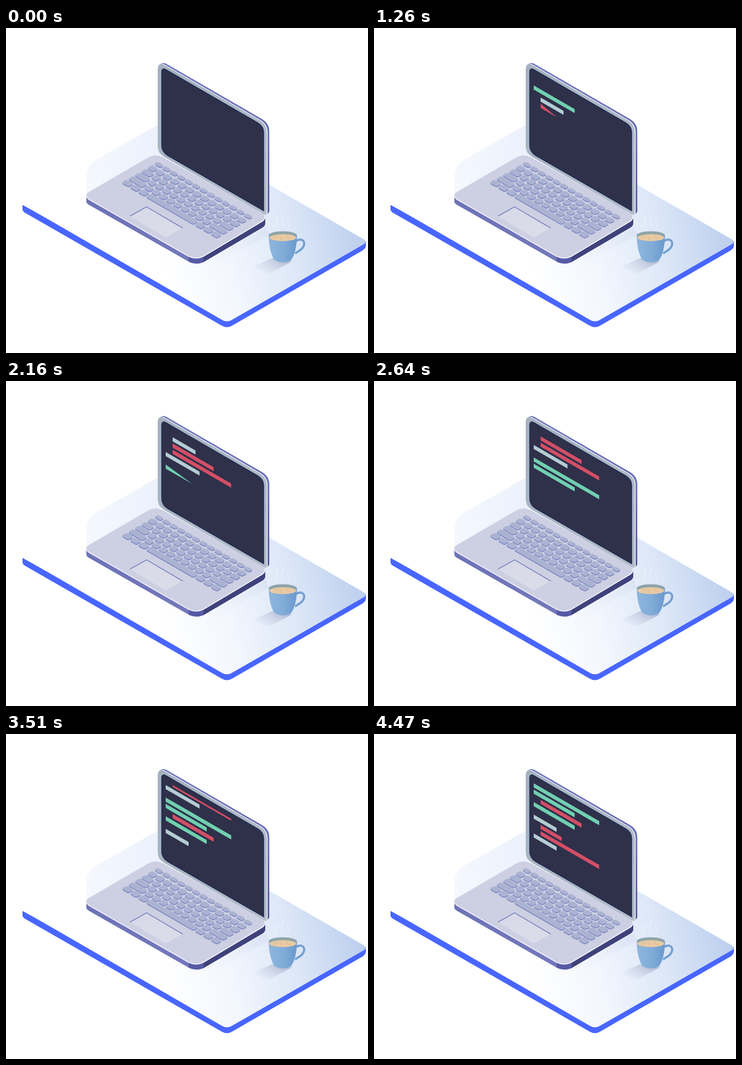
An HTML page that plays this animation: 680x610 px, repeating every 4.5 s.

```html
<!DOCTYPE html>
<html lang="en">
<head>
<meta charset="utf-8">
<title>Laptop typing code</title>
<style>
html, body { margin: 0; width: 100%; height: 100%; overflow: hidden; background: #fff; }
svg { display: block; width: 680px; height: 610px; }
</style>
</head>
<body>
<svg viewBox="0 0 680 610">
  <defs>
    <linearGradient id="desk" gradientUnits="userSpaceOnUse" x1="290" y1="440" x2="674" y2="355">
      <stop offset="0" stop-color="#fff"/><stop offset=".33" stop-color="#f2f6fd"/>
      <stop offset=".65" stop-color="#dbe6f7"/><stop offset="1" stop-color="#bacdee"/>
    </linearGradient>
    <linearGradient id="pale"><stop offset="0" stop-color="#f5f8fe"/><stop offset="1" stop-color="#ebf1fc"/></linearGradient>
    <linearGradient id="lid" x1="0" y1="0" x2="0" y2="1"><stop offset="0" stop-color="#767cc2"/><stop offset="1" stop-color="#4d519c"/></linearGradient>
    <linearGradient id="frame" x1="0" y1="0" x2="1" y2="1"><stop offset="0" stop-color="#a5b1bf"/><stop offset="1" stop-color="#b3bcca"/></linearGradient>
    <linearGradient id="side"><stop offset="0" stop-color="#6d73b7"/><stop offset="1" stop-color="#7479bd"/></linearGradient>
    <linearGradient id="pad" x1="0" y1="0" x2="0" y2="1"><stop offset="0" stop-color="#d7d9e8"/><stop offset="1" stop-color="#dcdde9"/></linearGradient>
    <linearGradient id="cup"><stop offset="0" stop-color="#8db7dd"/><stop offset=".55" stop-color="#80abd8"/><stop offset="1" stop-color="#6a99cd"/></linearGradient>
    <linearGradient id="shade" x1="1" y1="0" x2="0" y2=".7"><stop offset=".2" stop-color="#a9b2cc" stop-opacity=".85"/><stop offset="1" stop-color="#d5dcec" stop-opacity=".1"/></linearGradient>
    <linearGradient id="cast" x1="1" y1="0" x2="0" y2="1"><stop offset="0" stop-color="#d3dbee" stop-opacity=".6"/><stop offset="1" stop-color="#eef1f9" stop-opacity=".1"/></linearGradient>
  </defs>

  <!-- desk -->
  <path fill="#4866ff" d="M31 332V340Q31 344 36 347L405 558.500Q415 564.500 425 558.500L670 417.500Q676 413.500 676 408V400L415 545Z"/>
  <path fill="url(#desk)" d="M35 333.500L406 548Q415 553 424 548L671 406.500Q680 401 671 396L305 185Q294 178 283 182L35 325Q28 329 35 333.500Z"/>
  <path fill="url(#pale)" d="M290 179L168 248Q151 258 151 283V318L290 260Z"/>
  <path fill="url(#cast)" d="M372 441L487 374L496 388L398 440Z"/>

  <!-- base -->
  <path fill="url(#side)" d="M151 315V326Q151 329 156 332L344 439L357 432Z"/>
  <path fill="#3f427b" d="M370 440L482 374.500Q487 371.500 487 366V356L357 425Z"/>
  <path fill="#575ba6" d="M343 428V438.500Q357 445.500 371 439.500V428Z"/>
  <path fill="#cdd0e2" d="M157 307L262 246Q278 235 294 242L480 346Q487 350 487 356Q487 360 481 363.500L371 428.500Q357 435.500 343 428.500L157 323Q151 319 151 314Q151 310 157 307Z"/>
  <path fill="none" stroke="#f4f5fc" stroke-width="1.600" d="M152 316Q152 320 158 323L343 428.500Q357 435.500 371 428.500L481 363Q487 359 486 353"/>
  <g id="keys" transform="matrix(.866 .5 -.866 .5 285 251)"></g>
  <path fill="url(#pad)" d="M264 337L331 376L300 393L234 354Z"/>
  <path fill="none" stroke="#7b82bd" stroke-width="1.500" d="M233 353L264 335.500L332 375.500"/>

  <!-- lid -->
  <path fill="url(#lid)" d="M288 71Q292 63 301 67L481 171Q494.500 179 494.500 194V343Q494.500 348 488 350L470 330Z"/>
  <path fill="#f3f5fb" d="M286 74Q290 64 298.500 69L478.500 173Q491.500 181 491.500 196V349L484 349Z"/>
  <path fill="url(#frame)" d="M285 79Q285 63.500 297 69.500L477 173.500Q490 181.500 490 196V345Q490 352 484 349L297 242Q285 235 285 222Z"/>
  <path fill="#2f304a" stroke="#1b2c51" stroke-width="1.500" d="M292.500 83Q292.500 74 300 78L473 178Q484 185 484 196V343L303 239Q292.500 232 292.500 221Z"/>
  <g id="code"></g>

  <!-- cup -->
  <path fill="url(#shade)" d="M505 430L462 449L494 461L537 438Z"/>
  <path fill="none" stroke="#72a0d2" stroke-width="4" d="M545 400C553 394 561 398 560 406C559 414 551 418 543 423"/>
  <path fill="url(#cup)" d="M493.500 389C493.500 411 499 429 505 436Q520 444 535 436C542 428 546.500 410 546.500 389Z"/>
  <ellipse cx="520" cy="389" rx="26.500" ry="7.500" fill="#8fa4a9"/>
  <ellipse cx="520" cy="393.500" rx="25" ry="6.500" fill="#e8c9a3"/>
  <path fill="none" stroke="#d4ad80" stroke-width=".8" d="M503 393Q510 387 512 394M517 390V398M527 389Q526 394 534 395"/>
  <path fill="none" stroke="#fff" stroke-opacity=".65" d="M508 374C503 367 513 364 508 356M520 371C512 362 525 357 519 345M531 374C536 367 525 364 531 356"/>
</svg>
<script>
const NS = 'http://www.w3.org/2000/svg';
const add = (parent, tag, attrs) => {
  const el = parent.appendChild(document.createElementNS(NS, tag));
  for (const k in attrs) el.setAttribute(k, attrs[k]);
  return el;
};

// Keyboard: key widths per row, laid out on the isometric plane
const keys = document.getElementById('keys');
const fill = (n, w) => Array(n).fill(w);
const rows = [
  fill(13, 16.1),
  fill(13, 16.1),
  [22, ...fill(11, 15.4), 18],
  [27, ...fill(10, 15.6), 26],
  [34, ...fill(9, 15.6), 35],
  [17.5, 17.5, 17.5, 106, 17, 17, 17]
];
for (const [lift, color] of [[1.8, '#7d86c3'], [0, '#abb3d2']]) {
  rows.forEach((row, r) => {
    const height = r ? 11.2 : 8;
    let x = 0;
    for (const w of row) {
      add(keys, 'rect', {
        x: x + lift, y: 4 + 13.8 * r - height / 2 + lift,
        width: w - 2.6, height, rx: 3.6, fill: color
      });
      x += w;
    }
  });
}

// Code lines: slot, left, right, colour, time the line starts to leave
const G = '#70d0b0', R = '#d34f65', W = '#b4cdd3';
const lines = [
  [0, 300, 423, G, 300], [1.17, 313, 423, R, 900], [2.7, 300, 377, G, 1620],
  [4, 313, 356, W, 2280], [5, 313, 390, R, 2730], [6, 313, 423, R, 3330],
  [7, 300, 363.5, W, 3660], [9, 300, 423, G], [10, 300, 377, G],
  [11, 313, 390, R], [12, 300, 377, G], [14, 300, 343, W],
  [15, 313, 352.5, R], [16, 313, 423, R], [17, 300, 343, W]
];
const LOOP = 4500, STEP = 30, EVERY = 300, LEAVE = 330;
const SLOPE = 0.577, PITCH = 11.75, THICK = 7.6, SPEED = 0.0278;
const code = document.getElementById('code');
const bars = lines.map(l => add(code, 'polygon', { fill: l[3] }));
const ramp = (t, from, to) => Math.min(1, Math.max(0, (t - from) / (to - from)));

function draw(now) {
  const t = Math.floor(now % LOOP / STEP) * STEP;
  const scroll = SPEED * Math.max(0, t - EVERY);
  lines.forEach(([slot, left, right, , leave = Infinity], i) => {
    const age = t - i * EVERY;
    const gone = leave < LOOP ? ramp(t, leave, leave + LEAVE) : 0;
    const visible = age > 0 && gone < 1;
    bars[i].style.display = visible ? '' : 'none';
    if (!visible) return;
    const bottom = x => 102.8 + slot * PITCH - scroll + (x - 300) * SLOPE + THICK;
    const top = x => bottom(x) - THICK * (1 - gone);
    // the lower edge runs ahead of the upper one
    const low = left + (right - left) * ramp(age, 0, 150);
    const high = left + (right - left) * ramp(age, 90, 180);
    bars[i].setAttribute('points',
      [left, top(left), high, top(high), low, bottom(low), left, bottom(left)].join(' '));
  });
  requestAnimationFrame(draw);
}
requestAnimationFrame(draw);
</script>
</body>
</html>
```
